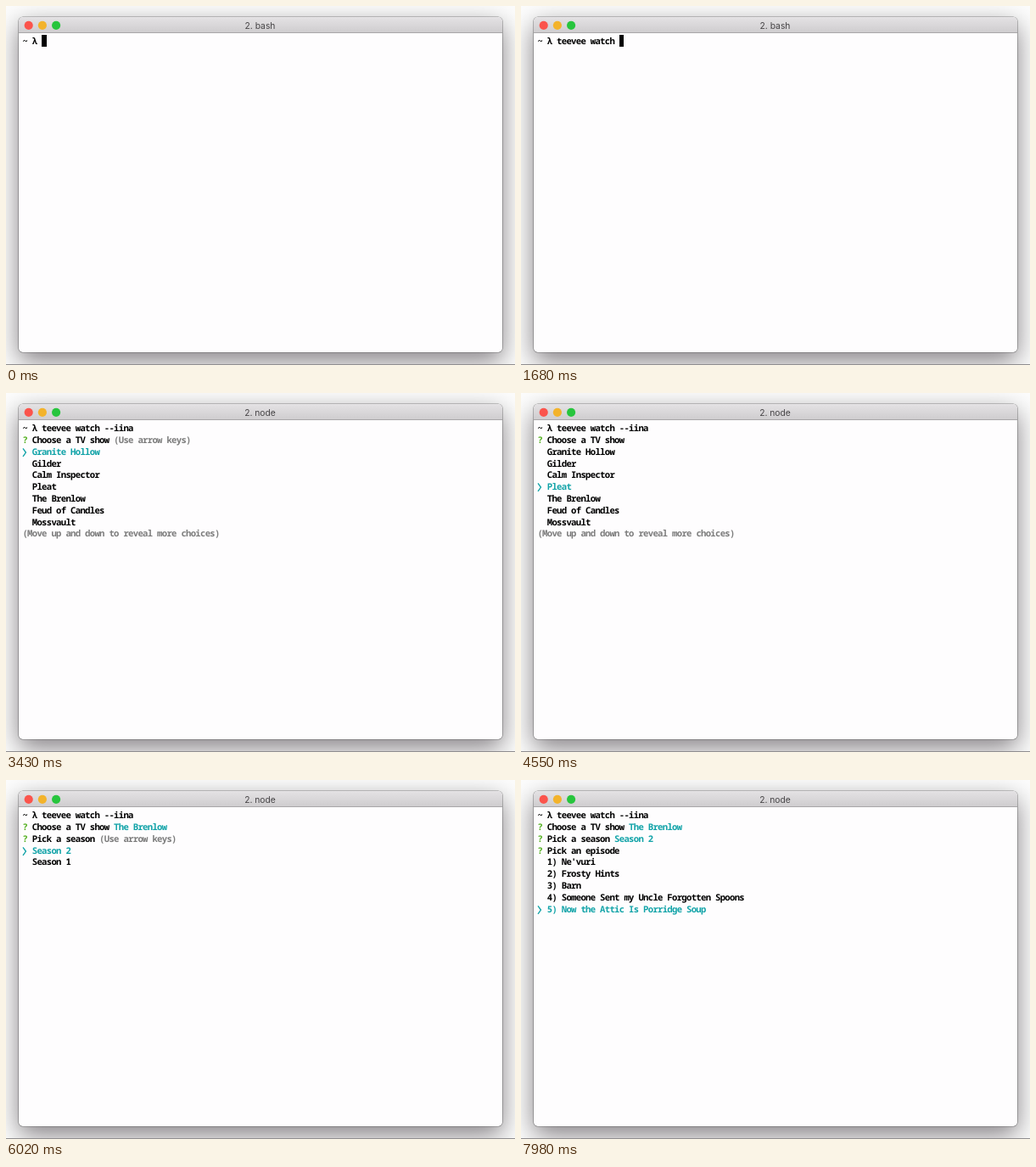
Recreate the animation shown at these times as an HTML page. Size 600x423 px, loop 8000 ms.

```html
<!DOCTYPE html>
<html lang="en">
<head>
<meta charset="utf-8">
<title>Terminal session</title>
<style>
  html, body { margin: 0; width: 100%; height: 100%; overflow: hidden; background: #fff; }
  #stage { position: relative; width: 600px; height: 423px; overflow: hidden; background: #fdfdfd; }
  #stage::after {
    content: ""; position: absolute; left: 0; right: 0; bottom: 0; height: 1px; background: #8f8d8f;
  }
  #window {
    position: absolute; left: 15px; top: 13px; width: 570px; height: 395px;
    border-radius: 5px; background: #fefdfe;
    box-shadow: 0 0 0 .6px rgba(0, 0, 0, .4), 0 10px 30px rgba(10, 0, 10, .5);
  }
  #bar {
    position: absolute; left: 0; top: 0; width: 570px; height: 18px;
    border-radius: 5px 5px 0 0; border-bottom: 1px solid #a9a7a9;
    background: linear-gradient(#e4e2e4, #cfcdcf);
  }
  #title {
    position: absolute; left: 0; top: 0; width: 569px; text-align: center; color: #454345;
    font: 10.3px/20px Inter, "Liberation Sans", sans-serif;
  }
  #lights { position: absolute; left: 0; top: 0; width: 60px; height: 19px; }
  #screen {
    position: absolute; left: 19.4px; top: 34.4px; color: #000;
    font: 600 10.6px/13.77px "Noto Sans Mono", "DejaVu Sans Mono", monospace;
    letter-spacing: calc(5.67px - .6em);
    text-rendering: geometricPrecision;
  }
  #screen > * { position: absolute; white-space: pre; }
  #screen span { margin-top: 2px; }
  #screen .mark { color: #55b022; font-weight: 700; }
  #screen .bold { font-weight: 800; }
  #screen .cyan { color: #12a3a8; }
  #screen .hint { color: #7c7c7c; }
  #screen .cursor { width: 5.7px; height: 13.6px; margin-top: -.4px; background: #000; }
  #screen svg {
    width: 6px; height: 14px; margin-top: 1px;
    fill: none; stroke: #12a3a8; stroke-width: 1.4;
  }
</style>
</head>
<body>
<div id="stage">
  <div id="window">
    <div id="bar"></div>
    <div id="title">2. bash</div>
    <svg id="lights">
      <circle cx="11.7" cy="9.8" r="5.1" fill="#fb544c"/>
      <circle cx="27.9" cy="9.8" r="5.1" fill="#f3b32b"/>
      <circle cx="44.1" cy="9.8" r="5.1" fill="#27c53d"/>
    </svg>
  </div>
  <div id="screen"></div>
</div>
<script>
const LOOP = 8000, COL = 5.67, ROW = 13.77, PAGE = 7;

const command = "teevee watch --iina";
const keyTimes = [210, 280, 350, 490, 630, 770, 910, 980, 1050, 1190,
                  1330, 1400, 1680, 1820, 1960, 2240, 2380, 2450, 2590];
const shows = ["Granite Hollow", "Gilder", "Calm Inspector", "Pleat", "The Brenlow",
               "Feud of Candles", "Mossvault", "The Quiet Cupboard"];
const seasons = ["Season 2", "Season 1"];
const episodes = ["Ne'vuri", "Frosty Hints", "Barn",
                  "Someone Sent my Uncle Forgotten Spoons",
                  "Now the Attic Is Porridge Soup"].map((name, i) => `${i + 1}) ${name}`);

const enter = 2800, nodeStart = 3010;
const prompts = [
  { ask: "Choose a TV show", items: shows, open: 3150, moves: [3710, 4060, 4410, 4760], done: 5530 },
  { ask: "Pick a season", items: seasons, open: 5880, moves: [], done: 6440 },
  { ask: "Pick an episode", items: episodes, open: 6860, moves: [7280, 7490, 7700, 7910], done: LOOP }
];

const title = document.getElementById("title");
const screen = document.getElementById("screen");
const passed = (times, t) => times.filter(at => t >= at).length;
const place = (col, row) => `style="left:${(col * COL).toFixed(2)}px;top:${(row * ROW).toFixed(2)}px"`;
const text = (col, row, str, kind = "") => `<span class="${kind}" ${place(col, row)}>${str}</span>`;
const cursor = (col, row) => text(col, row, "", "cursor");
const pointer = row => `<svg ${place(0, row)}><path d="M1 2.4L4.4 7.1L1 11.8"/></svg>`;

function menu(items, picked, row) {
  // Long lists scroll once the pointer reaches the middle row.
  const first = items.length > PAGE ? Math.max(0, picked - 3) : 0;
  let html = "";
  items.slice(first, first + PAGE).forEach((item, i) => {
    const active = first + i === picked;
    if (active) html += pointer(row + i);
    html += text(2, row + i, item, active ? "cyan" : "");
  });
  if (items.length > PAGE)
    html += text(0, row + PAGE, "(Move up and down to reveal more choices)", "hint");
  return html;
}

function draw(t) {
  const typed = passed(keyTimes, t);
  let html = text(0, 0, "~ λ " + command.slice(0, typed));
  if (t < enter) return html + cursor(4 + typed, 0);

  let row = 1;
  for (const { ask, items, open, moves, done } of prompts) {
    if (t < open) return html + cursor(0, row);
    const picked = passed(moves, t);
    const after = ask.length + 3;
    html += text(0, row, "?", "mark") + text(2, row, ask, "bold");
    if (t < done) {
      if (!picked) html += text(after, row, "(Use arrow keys)", "hint");
      return html + menu(items, picked, row + 1);
    }
    html += text(after, row, items[picked], "cyan");
    row++;
  }
  return html;
}

let shown = "";
function tick() {
  const t = performance.now() % LOOP;
  const html = draw(t);
  if (html !== shown) screen.innerHTML = shown = html;
  title.textContent = t < nodeStart ? "2. bash" : "2. node";
  requestAnimationFrame(tick);
}
tick();
</script>
</body>
</html>
```
